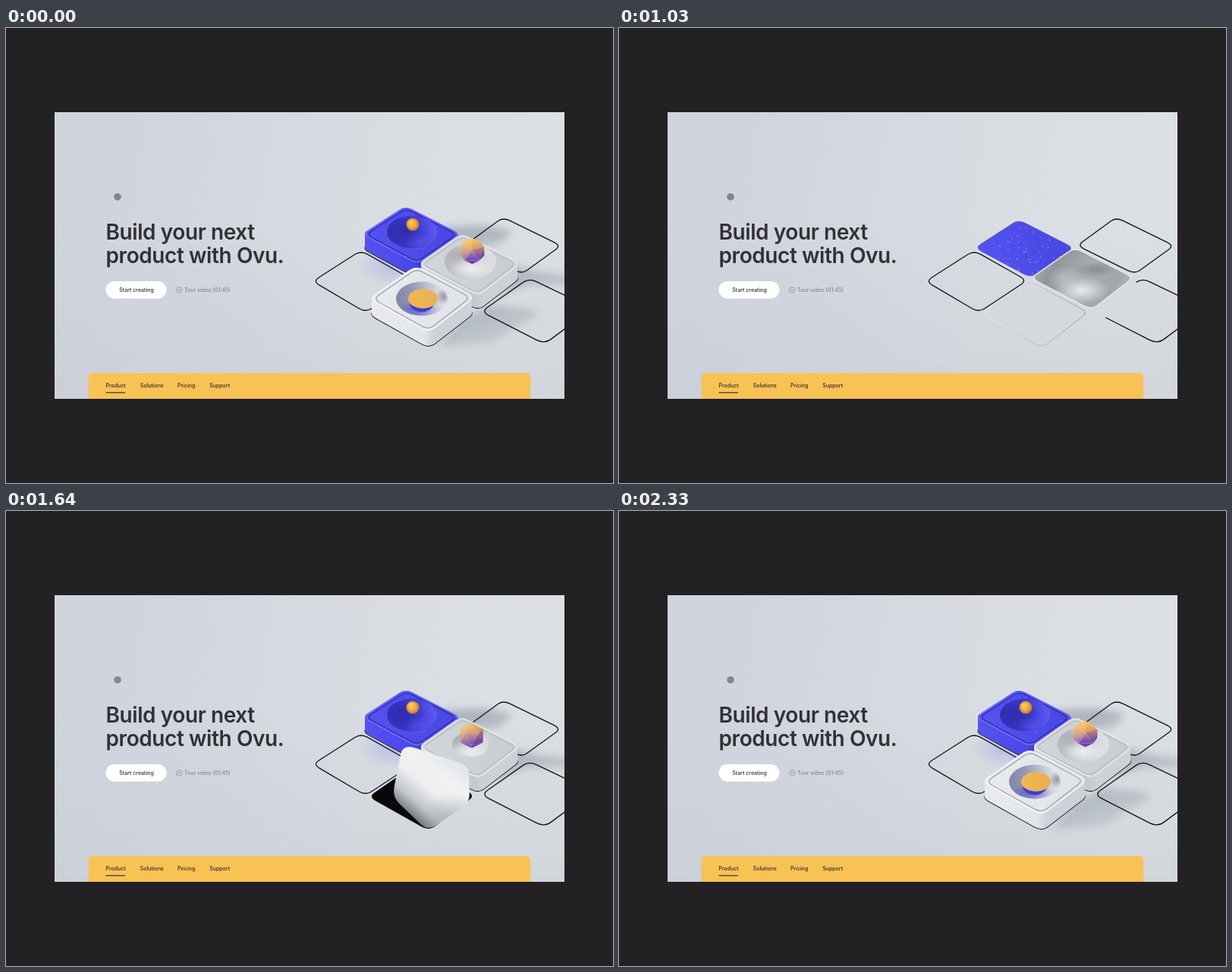
An HTML page with a canvas for the animation above (2.36 s loop, 800 by 600 pixels).

```html
<!DOCTYPE html>
<html lang="en">
<head>
<meta charset="utf-8">
<title>Product hero</title>
<style>
html, body { margin: 0; width: 100%; height: 100%; overflow: hidden; background: #232124; }
canvas, svg { position: absolute; left: 0; top: 0; display: block; }
text { font-family: Inter, "Open Sans", sans-serif; font-size: 7px; font-weight: 500; fill: #2b292d; }
.title { font-size: 28px; font-weight: 600; letter-spacing: -.42px; fill: #333136; }
.muted { fill: #85868c; }
</style>
</head>
<body>
<canvas id="scene" width="800" height="600"></canvas>
<svg width="800" height="600" viewBox="0 0 800 600">
  <circle cx="147" cy="222.700" r="4.800" fill="#85868b"/>
  <text class="title" x="131.500" y="279">Build your next</text>
  <text class="title" x="131.500" y="310">product with Ovu.</text>
  <rect x="131.500" y="334" width="80" height="22.700" rx="11.350" fill="#fff"/>
  <text x="149.300" y="348">Start creating</text>
  <circle cx="228.200" cy="345.400" r="3.800" fill="none" stroke="#8e8f95" stroke-width=".8"/>
  <path d="M227.200 343.800l2.600 1.600-2.600 1.600z" fill="#8e8f95"/>
  <text class="muted" x="235" y="348">Tour video (01:45)</text>
  <path d="M108.700 489V460a5 5 0 0 1 5-5H686.200a5 5 0 0 1 5 5V489z" fill="#f9c254"/>
  <text x="131.500" y="473.500">Product</text>
  <text x="176.800" y="473.500">Solutions</text>
  <text x="226" y="473.500">Pricing</text>
  <text x="268.200" y="473.500">Support</text>
  <rect x="131.500" y="480.200" width="25.500" height="1.200" fill="#3b3430"/>
</svg>
<script>
const LOOP = 2360;
const ROUND = .125;
const ctx = document.getElementById('scene').getContext('2d');

const lerp = (a, b, k) => a + (b - a) * k;
const seg = (t, a, b) => Math.min(1, Math.max(0, (t - a) / (b - a)));
const smooth = k => k * k * (3 - 2 * k);
const easeOut = k => 1 - (1 - k) ** 3;
const mixPts = (a, b, k) => a.map((p, i) => [lerp(p[0], b[i][0], k), lerp(p[1], b[i][1], k)]);
const shift = (pts, x, y) => pts.map(p => [p[0] + x, p[1] + y]);
const pairs = (...v) => Array.from({ length: v.length / 2 }, (_, i) => [v[2 * i], v[2 * i + 1]]);
const center = pts => [0, 1].map(a => pts.reduce((n, p) => n + p[a], 0) / pts.length);
const scalePts = (pts, s) => {
  const c = center(pts);
  return mixPts(pts.map(() => c), pts, s);
};
// Corner points sit outside the rounded extents given here.
const tile = (...v) => scalePts(pairs(...v), 1 / (1 - ROUND / 2));

const outlines = [
  tile(408.5, 334, 468, 296, 533.5, 333, 474, 372.5),
  tile(608, 287, 656, 252, 727.5, 287, 679, 322),
  tile(690, 332.5, 768, 370, 709, 414, 631, 374)
];
const flipMid = pairs(553, 294, 631, 265, 656, 350, 614, 372, 571, 354);
const blocks = [
  { kind: 'blue', ground: tile(473, 290, 527, 255, 595.5, 290, 542, 327), rise: 18, start: 1110,
    mid: shift(flipMid, -76.5, -38.5), bowl: [535, 269, 33, 21.5], dip: [1270, 1380],
    shadow: pairs(575, 262, 632, 260, 668, 268, 650, 286, 597, 290),
    colors: ['#5453f0', '#4a48ea', '#3c3acb', '#4846e2', '#7674fa', '#2b29a6'] },
  { kind: 'glass', ground: tile(547, 330, 601, 292, 674, 329, 622, 369), rise: 18.5, start: 1310,
    mid: flipMid, bowl: [612, 308, 34, 23], dip: [1500, 1720],
    shadow: pairs(645, 305, 690, 320, 750, 327, 750, 340, 690, 338, 640, 355),
    colors: ['#d2d6da', '#c5c9d0', '#cdd1d5', '#c9cdd1', '#eceef0', '#b6babf'] },
  { kind: 'white', ground: tile(482, 377, 541, 336, 614, 375, 557, 419), rise: 20, start: 1530,
    mid: pairs(523, 307, 610, 336, 611, 384, 556, 422, 509, 377), bowl: [548, 357, 34, 22.5], dip: [1720, 1850],
    shadow: pairs(600, 385, 640, 366, 690, 370, 702, 378, 672, 394, 640, 415, 570, 420),
    colors: ['#e9ebef', '#e2e5ea', '#cdd1d8', '#dee1e5', '#f6f7f9', '#989ca4'] }
];

let seed = 7;
const rand = () => (seed = seed * 16807 % 2147483647) / 2147483647;
const specks = Array.from({ length: 110 }, () => [470 + rand() * 128, 250 + rand() * 80, .3 + rand() * .4]);

function trace(pts, k = ROUND) {
  const n = pts.length;
  ctx.beginPath();
  pts.forEach((p, i) => {
    const [a, b] = mixPts([p, p], [pts[(i + n - 1) % n], pts[(i + 1) % n]], k);
    i ? ctx.lineTo(...a) : ctx.moveTo(...a);
    ctx.quadraticCurveTo(...p, ...b);
  });
  ctx.closePath();
}
function fill(pts, style, k) { trace(pts, k); ctx.fillStyle = style; ctx.fill(); }
function stroke(pts, style, width, k) {
  trace(pts, k);
  ctx.strokeStyle = style;
  ctx.lineWidth = width;
  ctx.stroke();
}
function ramp(x0, y0, x1, y1, stops) {
  const g = ctx.createLinearGradient(x0, y0, x1, y1);
  stops.forEach((c, i) => g.addColorStop(i / (stops.length - 1), c));
  return g;
}
function glow(x, y, rx, ry, rgb, alpha) {
  ctx.save();
  ctx.translate(x, y);
  ctx.scale(rx, ry);
  const g = ctx.createRadialGradient(0, 0, 0, 0, 0, 1);
  g.addColorStop(0, `rgba(${rgb},${alpha})`);
  g.addColorStop(.5, `rgba(${rgb},${alpha * .5})`);
  g.addColorStop(1, `rgba(${rgb},0)`);
  ctx.fillStyle = g;
  ctx.fillRect(-1, -1, 2, 2);
  ctx.restore();
}
function ellipse(x, y, rx, ry, style) {
  ctx.beginPath();
  ctx.ellipse(x, y, rx, ry, 0, 0, 7);
  ctx.fillStyle = style;
  ctx.fill();
}
function clipped(draw) {
  ctx.save();
  ctx.clip();
  draw();
  ctx.restore();
}

function heightOf(b, i, t) {
  if (t < 1100) return 1 - smooth(seg(t, 590 + i * 35, 900 + i * 35));
  return easeOut(seg(t, b.start + 150, b.start + 225));
}
const popOf = (t, a, b) => t < 1100 ? 1 - smooth(seg(t, 560, 740)) : easeOut(seg(t, a, b));

function backdrop() {
  ctx.fillStyle = ramp(150, 130, 700, 230, ['#d0d4dd', '#d4d8e0', '#dadee2', '#dce0e3']);
  ctx.fillRect(64, 111, 672, 378);
  ctx.fillStyle = ramp(0, 260, 0, 489, ['rgba(200,205,214,0)', 'rgba(200,206,212,.55)']);
  ctx.fillRect(64, 111, 672, 378);
}

function bowl(b, k, lift) {
  if (k < .02) return;
  const [x, y0, rx, ry] = b.bowl, y = y0 + b.rise * (1 - lift);
  const tones = {
    blue: ['#3230b4', '#3836c4', '#4341d8', '#5f5df2'],
    glass: ['#b4b9be', '#c3c7cb', '#d3d6d9', '#dfe2e4'],
    white: ['#8286a8', '#9297b8', '#c0c4d2', '#eceef2']
  }[b.kind];
  ellipse(x, y, rx * k, ry * k, ramp(x - rx, y + 4, x + rx, y - 8, tones));
  clipped(() => {
    if (b.kind === 'blue') {
      glow(x - 8, y - 1, 26, 20, '34,32,145', .5);
      glow(x + 12, y + 14, 24, 12, '100,98,250', .45);
    } else if (b.kind === 'glass') {
      glow(x, y + 10, 30, 15, '240,242,243', .9);
      glow(x - 17, y - 9, 20, 14, '140,145,152', .4);
    } else {
      glow(x - 6, y + 14, 27, 11, '65,66,205', .6);
      glow(x + 29, y - 3, 10, 11, '95,99,120', .6);
    }
  });
}

function surface(b, top, h) {
  const [L, T, R, B] = top;
  fill(top, ramp(L[0], L[1] + 10, R[0], R[1] - 10, [b.colors[0], b.colors[3]]));
  clipped(() => {
    if (b.kind === 'blue') {
      specks.forEach(([x, y, r]) => {
        ctx.fillStyle = `rgba(205,205,255,${lerp(.75, .4, h)})`;
        ctx.fillRect(x, y - h * b.rise, r * 2, r * 2);
      });
    }
    ctx.globalAlpha = 1 - h;
    if (b.kind === 'glass') {
      ctx.fillStyle = ramp(L[0], T[1], R[0], B[1], ['#b9bdc0', '#92969a', '#a9adb0', '#a2a6aa', '#c4c8ca']);
      ctx.fillRect(L[0], T[1], R[0] - L[0], B[1] - T[1]);
      glow(610, 346, 36, 18, '244,246,247', .85);
      glow(588, 330, 24, 16, '205,208,211', .6);
      glow(628, 318, 28, 10, '115,120,124', .6);
    }
    if (b.kind === 'white') {
      ctx.fillStyle = '#d5d9dd';
      ctx.fillRect(L[0], T[1], R[0] - L[0], B[1] - T[1]);
    }
    ctx.globalAlpha = 1;
  });
}

function slab(b, h) {
  const lift = b.rise * h;
  const [L, T, R, B] = b.ground;
  if (h > .02) {
    stroke(shift(b.ground, 0, .6), `rgba(10,10,14,${.9 * h})`, 1.2);
    const side = ctx.createLinearGradient(L[0], 0, R[0], 0);
    const cut = (B[0] - L[0]) / (R[0] - L[0]);
    [[0, 0], [cut - .05, 1], [cut + .05, 2], [1, 2]].forEach(([k, c]) => side.addColorStop(k, b.colors[c]));
    for (let y = 0; y < lift; y++) fill(shift(b.ground, 0, -y), side);
  }
  const top = shift(b.ground, 0, -lift);
  surface(b, top, h);
  if (h > .02) {
    ctx.globalAlpha = h;
    stroke(scalePts(top, .985), b.colors[4], 1.2);
    stroke(shift(scalePts(top, .91), 0, .3), b.colors[5], 1.1);
    ctx.globalAlpha = 1;
  } else if (b.kind === 'white') {
    stroke(top, ramp(490, 370, 606, 390, ['#e9ebee', '#b9bdc4', '#898d94']), .8);
  } else if (b.kind === 'glass') {
    stroke(top, '#e6e8ea', 1.5);
  } else {
    stroke(top, 'rgba(60,58,180,.5)', .7);
  }
}

function panel(b, q) {
  const flat = [...b.ground, mixPts([b.ground[3]], [b.ground[0]], .5)[0]];
  const pts = q < .5
    ? mixPts(flat, b.mid, smooth(q * 2))
    : mixPts(b.mid, shift(flat, 0, -b.rise), smooth(q * 2 - 1));
  const [cx, cy] = center(pts);
  ctx.globalAlpha = 1 - seg(q, .78, 1);
  if (b.kind === 'blue') {
    fill(shift(pts, 2, 3), '#2f2db0', .2);
    fill(pts, ramp(cx - 40, cy - 30, cx + 40, cy + 30, ['#6362f3', '#4846de']), .2);
    stroke(pts, '#7977f6', 1, .2);
  } else if (b.kind === 'glass') {
    fill(pts, ramp(cx - 45, cy - 25, cx + 45, cy + 25, ['#e4e7e9', '#b3b8bc', '#d3d6d9', '#9a9ea3', '#e3e5e7']), .2);
    clipped(() => {
      glow(cx - 2, cy + 24, 38, 24, '125,129,134', .65);
      glow(cx - 12, cy - 14, 30, 24, '238,240,242', .6);
    });
    stroke(scalePts(pts, .97), 'rgba(246,248,249,.8)', 2, .2);
    stroke(scalePts(pts, .83), 'rgba(240,242,244,.45)', 1.2, .24);
  } else {
    fill(pts, ramp(cx - 34, cy + 40, cx + 28, cy - 36, ['#5c5f62', '#c3c6c9', '#eceef0', '#f0f1f3', '#e4e7ea']), .2);
    clipped(() => glow(cx + 28, cy + 42, 44, 34, '150,154,158', .6));
  }
  ctx.globalAlpha = 1;
}

function ball(k) {
  if (k < .02) return;
  const x = 536, y = lerp(276, 259, k), r = 8.6 * k;
  const g = ctx.createRadialGradient(x - r * .35, y - r * .4, 0, x, y, r);
  g.addColorStop(0, '#ffd069');
  g.addColorStop(.6, '#f2ae3c');
  g.addColorStop(1, '#b9762d');
  ellipse(x, y, r, r, g);
}

function disc(k) {
  if (k < .02) return;
  const y = lerp(363, 357, k);
  ellipse(548, y + 5, 16 * k, 12.5 * k, '#3c3ae0');
  ellipse(549.5, y, 19.5 * k, 12.8 * k, ramp(530, 350, 568, 364, ['#f0b751', '#e9b052']));
}

// Icosahedron turning about its upright axis.
function gem(k, t) {
  if (k < .02) return;
  const x = lerp(602, 614.5, k), y = lerp(334, 294, k), r = 18.5 * k;
  const turn = t / LOOP * Math.PI * 2 + .35, tilt = .38;
  const place = (px, py, pz) => [px, py * Math.cos(tilt) - pz * Math.sin(tilt), py * Math.sin(tilt) + pz * Math.cos(tilt)];
  const ring = (h, off) => Array.from({ length: 5 }, (_, i) => {
    const a = turn + (i + off) * Math.PI * .4;
    return place(.894 * Math.cos(a), h, .894 * Math.sin(a));
  });
  const up = ring(.447, 0), low = ring(-.447, .5), north = place(0, 1, 0), south = place(0, -1, 0);
  const faces = [];
  for (let i = 0; i < 5; i++) {
    const j = (i + 1) % 5;
    faces.push([north, up[i], up[j]], [up[i], up[j], low[i]], [low[i], low[j], up[j]], [south, low[i], low[j]]);
  }
  const body = ramp(x - 3, y - r, x + 3, y + r, ['#fbc854', '#f0b158', '#c58c8c', '#8054c0', '#6a3fc4']);
  for (const f of faces) {
    const n = [0, 1, 2].map(a => (f[0][a] + f[1][a] + f[2][a]) / 3);
    if (n[2] <= 0) continue;
    const pts = f.map(p => [x + p[0] * r, y - p[1] * r]);
    const light = n[1] * .35 - n[0] * .6 + n[2] * .1;
    fill(pts, body, 0);
    fill(pts, light > 0 ? `rgba(255,226,165,${light * .65})` : `rgba(70,32,75,${-light * .8})`, 0);
    stroke(pts, 'rgba(255,205,140,.2)', .4, 0);
  }
  if (k < .98) {
    ctx.globalAlpha = (1 - k) * .9;
    ellipse(x, y, r * .9, r * .9, '#5653dc');
    ctx.globalAlpha = 1;
  }
}

function draw(t) {
  ctx.fillStyle = '#232124';
  ctx.fillRect(0, 0, 800, 600);
  ctx.save();
  ctx.beginPath();
  ctx.rect(64, 111, 672, 378);
  ctx.clip();
  backdrop();

  const heights = blocks.map((b, i) => heightOf(b, i, t));
  ctx.filter = 'blur(5px)';
  blocks.forEach((b, i) => {
    const h = heights[i];
    if (h < .02) return;
    const from = b.shadow.map(() => [b.ground[2][0] - 30, b.ground[2][1]]);
    const [x, y] = b.ground[2];
    fill(mixPts(from, b.shadow, h), ramp(x, y - 10, x + 20, y + 45, [`rgba(128,137,152,${.48 * h})`, `rgba(140,148,160,${.2 * h})`]), .1);
  });
  ctx.filter = 'none';
  glow(510, 314, 48, 26, '110,112,240', .28 * heights[0]);

  outlines.forEach((o, i) => {
    const drawn = i === 2 && t > 900 && t < 1100 ? lerp(.75, 1, seg(t, 1000, 1100)) : 1;
    if (drawn < 1) ctx.setLineDash([298 * drawn, 300]);
    stroke(o, '#111115', 1.3);
    ctx.setLineDash([]);
  });

  blocks.forEach((b, i) => {
    const q = seg(t, b.start, b.start + 220), h = heights[i];
    const flipping = q > 0 && q < 1;
    if (flipping) fill(b.ground, '#08080a');
    if (!flipping || q > .7) {
      slab(b, h);
      bowl(b, t < 1100 ? h : smooth(seg(t, ...b.dip)), h);
    }
    if (flipping) panel(b, q);
    if (b.kind === 'blue') ball(popOf(t, 1380, 1560));
    if (b.kind === 'glass') gem(popOf(t, 1380, 1800), t);
    if (b.kind === 'white') disc(popOf(t, 1750, 1910));
  });
  ctx.restore();
}

const begin = performance.now();
function tick() {
  draw((performance.now() - begin) % LOOP);
  requestAnimationFrame(tick);
}
tick();
</script>
</body>
</html>
```
